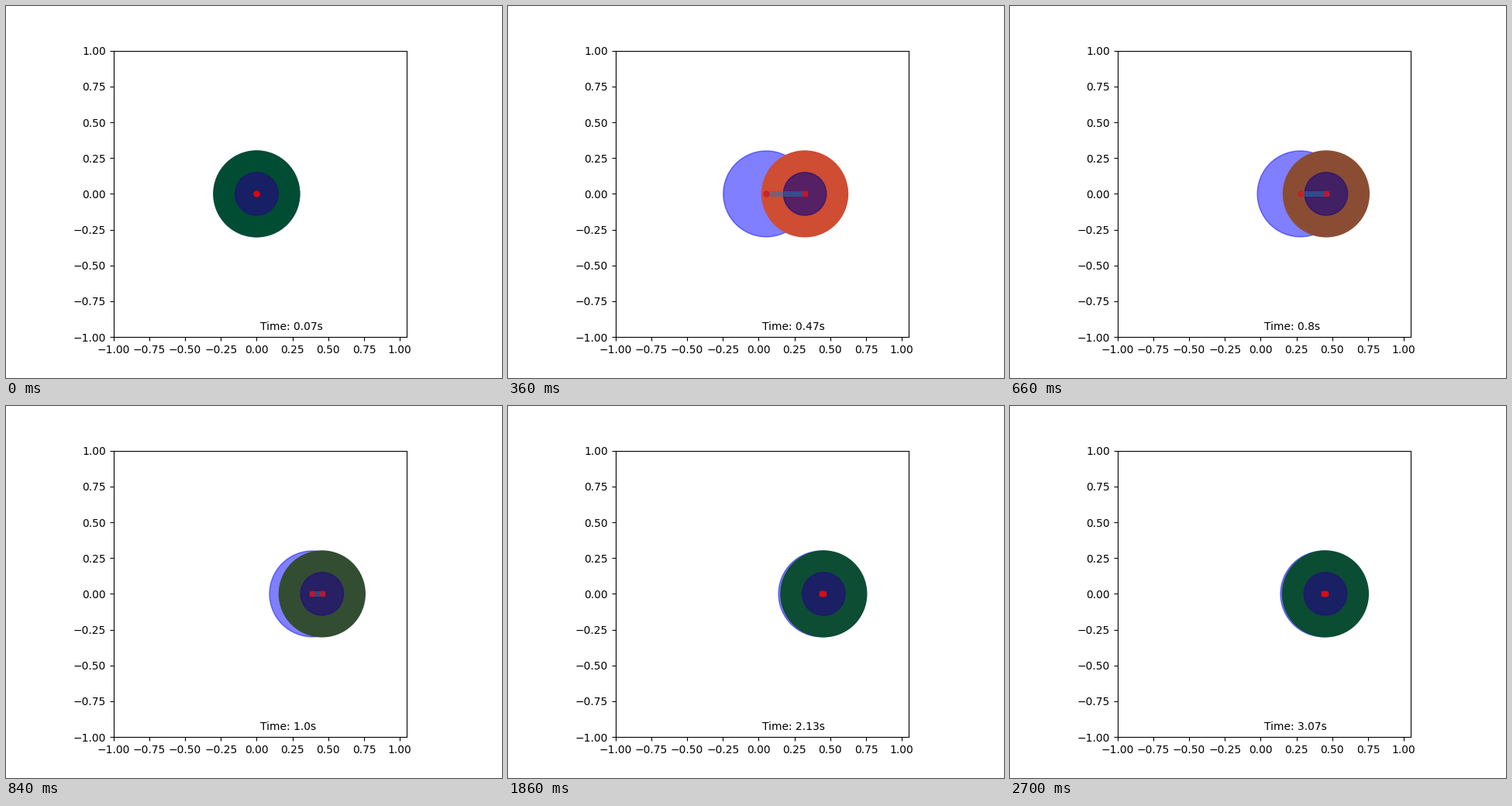
A matplotlib script for the animation above (2760 ms loop, 640 by 480 pixels).

```python
import numpy as np
import matplotlib.pyplot as plt
from matplotlib.animation import FuncAnimation

FRAMES = 46
INTERVAL = 60  # ms
STEP = 1 / 15  # simulated seconds per frame

LEADER_PEAK = 0.4575
FOLLOWER_END = 0.439


def min_jerk(tau):
    tau = np.clip(tau, 0, 1)
    return tau**3 * (10 - 15 * tau + 6 * tau**2)


def leader_x(t):
    drift = 0.0024 * max(0, t - 0.8)
    return LEADER_PEAK * min_jerk((t - 0.08) / 0.63) - drift


def follower_x(t):
    tau = np.interp(t, [0.17, 0.333, 0.467, 0.667, 0.8, 1.3],
                    [0, 0.146, 0.267, 0.437, 0.571, 1])
    return FOLLOWER_END * min_jerk(tau)


fig, ax = plt.subplots(figsize=(6.4, 4.8), dpi=100)
ax.set_aspect("equal")
ax.set_xlim(-1, 1.05)
ax.set_ylim(-1, 1)


def add_circle(radius, **style):
    return ax.add_patch(plt.Circle((0, 0), radius, **style))


follower = add_circle(0.3, color="blue", alpha=0.5)
leader = add_circle(0.3, color=(0, 0.3, 0.2))
core = add_circle(0.15, color=(34 / 255, 13 / 255, 121 / 255), alpha=0.7)
link, = ax.plot([], [], color="C0", lw=5, alpha=0.5)
dots = [ax.plot([], [], "o", color="red", ms=5, alpha=0.6)[0]
        for _ in range(2)]
label = ax.text(0.025, -0.95, "")


def update(i):
    t = (i + 1) * STEP
    xl, xf = leader_x(t), follower_x(t)
    follower.center = (xf, 0)
    leader.center = core.center = (xl, 0)
    # The disc reddens as the gap grows
    leader.set_color((np.clip(3 * (xl - xf), 0, 1), 0.3, 0.2))
    link.set_data([xf, xl], [0, 0])
    for dot, x in zip(dots, (xf, xl)):
        dot.set_data([x], [0])
    label.set_text(f"Time: {round(t, 2)}s")
    return follower, leader, core, link, *dots, label


anim = FuncAnimation(fig, update, frames=FRAMES, interval=INTERVAL,
                     repeat=True, repeat_delay=0)
plt.show()
```
